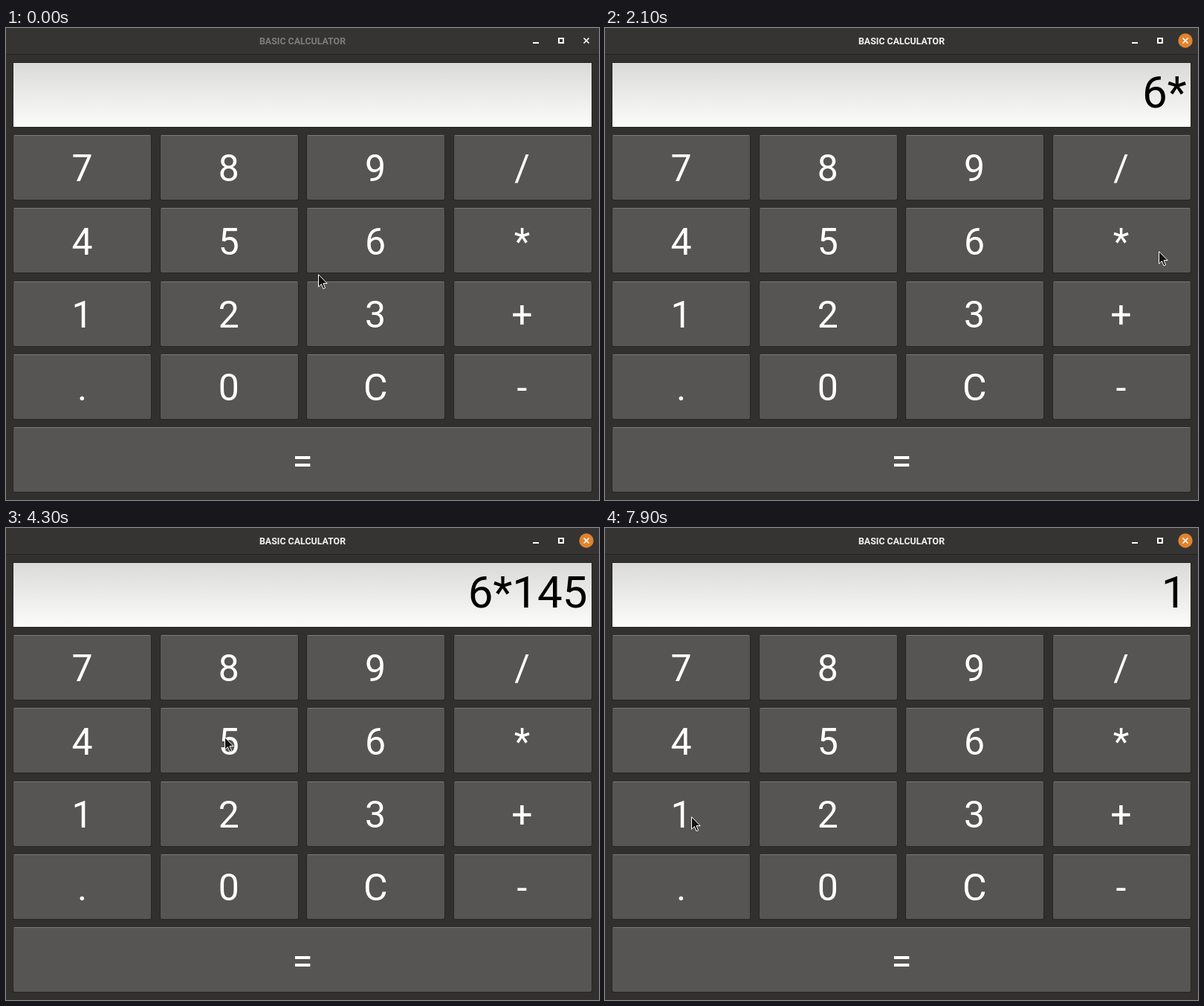
Recreate the animation shown at these times as an HTML page. Size 798 px wide and 635 px high, loop 8000 ms.

```html
<!DOCTYPE html>
<html lang="en">
<head>
<meta charset="utf-8">
<title>Calculator</title>
<style>
html, body { margin: 0; width: 100%; height: 100%; overflow: hidden; background: #32302f; }
svg { display: block; width: 798px; height: 635px; font-family: Roboto, sans-serif; }
.key { fill: #565553; }
.key.down { fill: #454442; }
.edge { fill: #7b7a78; }
.down + .edge { fill: #3a3837; }
.label { font-size: 50px; fill: #fff; text-anchor: middle; }
#title { font-size: 12.4px; font-weight: 600; text-anchor: middle; fill: #7d7c7a; }
#close { fill: none; }
.focus #title { fill: #f2f2f1; }
.focus #close { fill: #e0832f; }
#out { font-size: 60px; text-anchor: end; }
</style>
</head>
<body>
<svg id="win" viewBox="0 0 798 635">
  <defs>
    <linearGradient id="paper" x2="0" y2="1">
      <stop stop-color="#dadad9"/><stop offset="1" stop-color="#fcfcfb"/>
    </linearGradient>
  </defs>
  <rect width="798" height="635" fill="#32302f"/>
  <rect width="798" height="35" fill="#353432"/>
  <rect y="35" width="798" height="1" fill="#242321"/>
  <text id="title" x="399" y="21.5">BASIC CALCULATOR</text>
  <rect x="709" y="19" width="8" height="2" fill="#fff"/>
  <rect x="744" y="14" width="6" height="6" fill="none" stroke="#fff" stroke-width="2"/>
  <circle id="close" cx="781" cy="17" r="9.7"/>
  <path d="M777.5 13.5l7 7m0-7l-7 7" stroke="#fff" stroke-width="1.7"/>
  <rect x="9" y="46" width="780" height="88" rx="1" fill="#252322"/>
  <rect x="10" y="47" width="778" height="86" fill="url(#paper)"/>
  <text id="out" x="782.5" y="107"></text>
  <g id="keys"></g>
  <path id="cursor" d="M.5.7V17.2L4.4 13.6 7 19.8 9.6 18.7 7 12.6H12.2Z" fill="#111" stroke="#fff" stroke-linejoin="round"/>
</svg>
<script>
const $ = id => document.getElementById(id);
const rect = (x, y, w, h, attrs) =>
  `<rect x="${x}" y="${y}" width="${w}" height="${h}" ${attrs}/>`;

$('keys').innerHTML = [...'789/456*123+.0C-='].map((key, i) => {
  const col = i % 4, row = i >> 2, wide = key === '=';
  const x = Math.round(10 + col * 197.67);
  const y = Math.round(144 + row * 98.3);
  const w = wide ? 778 : 185;
  const mid = wide ? 399 : 102.5 + col * 197.33;
  const base = Math.round(206.3 + row * 98.3);
  return rect(x - 1, y + 1, w + 2, 87, 'rx="2" fill="#272524"') +
    rect(x, y, w, 87, `rx="2" class="key" data-key="${key}"`) +
    rect(x + 1, y, w - 2, 1, 'class="edge"') +
    `<text class="label" x="${mid}" y="${base}">${key}</text>`;
}).join('');
const faces = document.querySelectorAll('.key');

// The session is written as a script; each step advances the clock
let clock = 0;
const glides = [], presses = [];
const rest = ms => { clock += ms; };
const glide = (ms, x, y, lift = 0) => {
  glides.push({ from: clock, ms, x, y, lift });
  clock += ms;
};
const press = (key, held = 100) => {
  presses.push({ key, down: clock, up: clock + held });
  clock += held;
};
const tap = key => press(key, 0);

rest(200); glide(500, 465, 259, -80);
rest(100); glide(200, 488, 279);
rest(300); press('6');
glide(400, 745, 300);
rest(200); press('*');
rest(100); glide(600, 146, 390, 250);
rest(200); press('1');
glide(200, 149, 331);
rest(200); glide(100, 148, 319);
rest(100); press('4');
glide(300, 294, 281);
rest(200); tap('5');
glide(500, 302, 590);
rest(100); tap('=');
rest(600); glide(500, 694, 170);
glide(400, 458, 485);
rest(200); tap('C');
rest(200); glide(900, 116, 388, -299);
rest(200); tap('1');
const focusTime = presses[0].down - 100;

function enter(text, key) {
  if (key === 'C') return '';
  if (key === '=') return String(text.split('*').reduce((a, b) => a * b));
  return text + key;
}

function pointer(t) {
  let x = 420, y = 331;
  for (const g of glides) {
    if (t <= g.from) break;
    const p = Math.min(1, (t - g.from) / g.ms);
    const s = p * p * (3 - 2 * p);
    x += (g.x - x) * s;
    y += (g.y - y) * s + 2 * s * (1 - s) * g.lift;
  }
  return [Math.round(x), Math.round(y)];
}

function draw(now) {
  const t = Math.floor(now % 8000 / 100) * 100;
  const held = presses.find(p => p.down <= t && t < p.up);
  $('win').classList.toggle('focus', t >= focusTime);
  $('out').textContent = presses.filter(p => p.up <= t).reduce((s, p) => enter(s, p.key), '');
  faces.forEach(f => f.classList.toggle('down', f.dataset.key === held?.key));
  $('cursor').setAttribute('transform', `translate(${pointer(t)})`);
}

let start;
function tick(now) {
  start ??= now;
  draw(now - start);
  requestAnimationFrame(tick);
}
draw(0);
requestAnimationFrame(tick);
</script>
</body>
</html>
```
